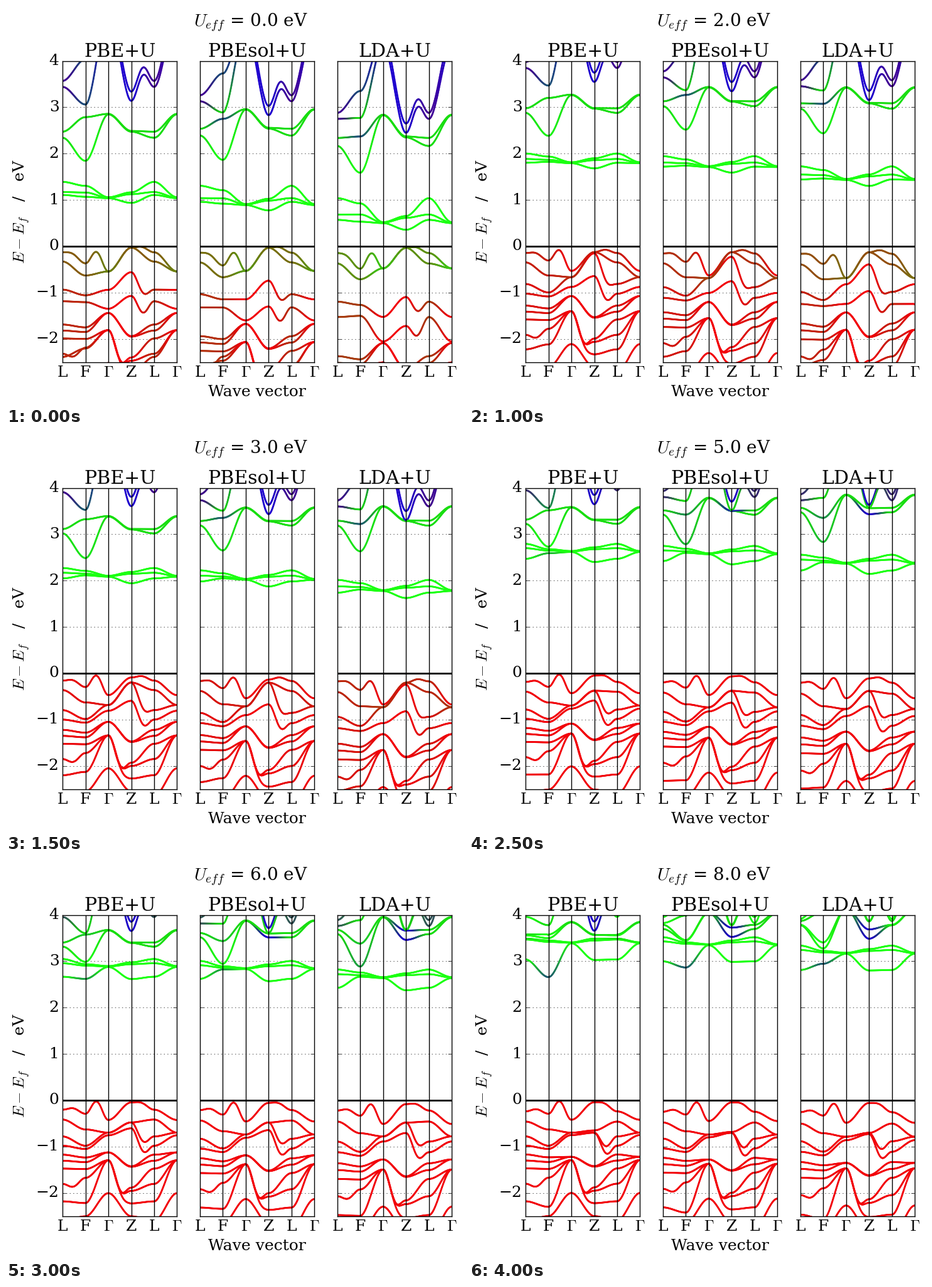
A matplotlib script for the animation above (4.5 s loop, 728 by 636 pixels).

```python
import numpy as np
import matplotlib.pyplot as plt
from matplotlib.animation import FuncAnimation
from matplotlib.collections import LineCollection

W, H, DPI = 728, 636, 100
LEFT, BOTTOM, AX_W, AX_H, STEP = 90.12, 68.4, 182.35, 480, 218.82
U_MAX = 8
plt.rcParams.update({"font.family": "DejaVu Serif", "font.size": 18,
                     "mathtext.fontset": "cm", "axes.linewidth": 1.0})

RED = np.array([0.96, 0.02, 0.08])
GREEN = np.array([0.18, 1.0, 0.13])
BLUE = np.array([0.19, 0.0, 0.85])
PURPLE = np.array([0.36, 0.0, 0.66])

# Levels of each orbital group at the symmetry points, in eV from the centre
# of the group: energy, then optionally its pull by the offset and its drift with U
L = dict(s=[(0.30,), (0.43,)],
         eg=[(-0.35, -0.30), (-0.26, -0.22)],
         t2g=[(0.06, 0, -0.42), (0.07, 0.10), (0.16, 0.35)],
         d=[(-0.13, 0, -0.11), (-0.33, 0, -0.13)],
         p=[(-0.78, 0.7), (-0.98, 0.6), (-1.17,), (-1.30,), (-1.47,), (-1.80,),
            (-2.18, 0.6), (-2.60,)])
F = dict(s=[(-0.08,), (0.90,)],
         eg=[(-0.06,)],
         dip=[(-0.77, -0.45, -0.41)],
         t2g=[(0.02,), (0.05, 0.12), (0.10, 0.30)],
         d=[(-0.29, -0.15), (-0.63,)],
         p=[(-0.98, 0.85), (-1.05, 0.7), (-1.23,), (-1.33,), (-1.48,), (-1.67,),
            (-2.05, 0.7, -0.25), (-2.50,)])
G = dict(s=[(1.90,), (2.10,)],
         eg=[(0.0,), (0.01,)],
         t2g=[(-0.01,), (0.0,), (0.01,)],
         d=2 * [(-0.70, 0.3)],
         p=[(-0.42,), (-0.75, -0.15)] + 2 * [(-0.92, 0, -0.30)]
           + 3 * [(-1.29,)] + [(-2.0,)])
Z = dict(s=[(0.0,), (0.20,)],
         eg=[(-0.27, -0.20), (-0.26, -0.19)],
         t2g=[(-0.07, -0.08, -0.30), (0.05, 0.05), (0.09, 0.05)],
         d=2 * [(-0.03, 0, -0.67)],
         p=[(-0.04,), (-0.50, -0.1, -0.15), (-1.42,), (-1.43,), (-1.88,),
            (-1.95,), (-2.22,), (-2.50,)])
PATH = [L, F, G, Z, L, G]

# Arches between two symmetry points: (band from below, segment, height)
ARCHES = [(9, 0, 0.07), (9, 1, 0.33), (9, 3, 0.06), (7, 3, -0.25), (6, 3, -0.30),
          (3, 2, -0.35), (2, 2, -0.30), (1, 2, -0.20), (2, 0, -0.12),
          (15, 3, 0.40), (16, 3, 0.40)]

# s, eg and t2g: group centres; offset and decay: shift of the p and s states
# against the d states, fading as U grows; stretch: width of the valence bands
PANELS = [dict(name="PBE+U", s=3.66, eg=3.16, t2g=1.36,
               offset=0.52, decay=1.3, stretch=1.0),
          dict(name="PBEsol+U", s=3.53, eg=3.37, t2g=1.32,
               offset=0.70, decay=1.5, stretch=1.06),
          dict(name="LDA+U", s=3.50, eg=3.46, t2g=1.14,
               offset=1.05, decay=1.8, stretch=1.13)]

X = np.linspace(0, 5, 201)


def mix(a, b, share):
    share = min(max(share, 0), 1)
    return a * (1 - share) + b * share


def tint(group, point, u, panel):
    """Orbital character as red (p), green (d) and blue (s) weights."""
    green = np.sqrt(panel["offset"]) * np.exp(-(u / (1.6 * panel["decay"]))**2)
    grown = u / U_MAX
    if group == "s":
        base = PURPLE if point is L else BLUE
        return mix(base, GREEN, 0.4 * (point is F) + grown**3 * (point is not Z))
    if group == "dip":
        return mix(GREEN, BLUE, 0.55 * grown**2)
    if group == "d":
        return mix(RED, GREEN, green * (0.8 if point is G else 0.62))
    if group == "p":
        return mix(RED, GREEN, green * (0.3 if point in (L, F) else 0))
    return GREEN * (0.9 if group == "eg" else 1)


def levels(point, u, panel):
    """Sorted energies at one symmetry point, with their colours."""
    shift = panel["offset"] * np.exp(-u / panel["decay"])
    drift = (u / U_MAX)**1.4
    eg = panel["eg"] + 0.085 * u - 0.6 * shift
    centre = dict(s=panel["s"] - shift, eg=eg, dip=eg,
                  t2g=panel["t2g"] + 0.255 * u - 0.6 * shift, d=0, p=-shift)
    found = []
    for group, members in point.items():
        scale = panel["stretch"] if group in "dp" else 1
        color = tint(group, point, u, panel)
        for e, pull, sink in ((*m, 0, 0)[:3] for m in members):
            found.append((centre[group] + scale * e + pull * shift + sink * drift, color))
    found.sort(key=lambda level: level[0])
    energy, colors = zip(*found)
    return np.array(energy), np.array(colors)


def along(nodes, x):
    """Ease from node to node, flat at every symmetry point."""
    i = np.minimum(x.astype(int), len(nodes) - 2)
    t = x - i
    t = (t * t * (3 - 2 * t)).reshape((-1,) + (1,) * (nodes.ndim - 1))
    return nodes[i] * (1 - t) + nodes[i + 1] * t


def bands(u, panel):
    energy, colors = zip(*(levels(point, u, panel) for point in PATH))
    curves = along(np.array(energy), X)
    for band, seg, height in ARCHES:
        inside = (X >= seg) & (X <= seg + 1)
        curves[inside, band] += height * np.sin(np.pi * (X[inside] - seg))**2
    shades = along(np.array(colors), (X[1:] + X[:-1]) / 2)**1.3
    pts = np.stack([np.broadcast_to(X[:, None], curves.shape), curves], axis=-1)
    segments = np.stack([pts[:-1], pts[1:]], axis=2)
    return segments.reshape(-1, 2, 2), shades.reshape(-1, 3)


def make_axes(n, panel):
    ax = fig.add_axes([(LEFT + STEP * n) / W, BOTTOM / H, AX_W / W, AX_H / H])
    ax.set_xlim(0, 5)
    ax.set_ylim(-2.5, 4)
    ax.set_title(panel["name"], fontsize=21.6, pad=5)
    ax.set_xticks(range(6), ["L", "F", r"$\Gamma$", "Z", "L", r"$\Gamma$"])
    ticks = range(-2, 5)
    ax.set_yticks(ticks, [str(v).replace("-", "\u2212") if n == 0 else ""
                          for v in ticks], va="center")
    ax.tick_params(direction="in", length=4, width=0.5, pad=4, top=True, right=True)
    ax.grid(axis="y", color="black", linewidth=0.5, linestyle=(0, (2, 6)))
    ax.set_axisbelow(True)
    for x in range(1, 5):
        ax.axvline(x, color="black", linewidth=1)
    ax.axhline(0, color="black", linewidth=2)
    lines = LineCollection([], linewidths=2, capstyle="round", zorder=1)
    ax.add_collection(lines, autolim=False)
    return lines


fig = plt.figure(figsize=(W / DPI, H / DPI), dpi=DPI, facecolor="white")
bundles = [make_axes(n, panel) for n, panel in enumerate(PANELS)]
fig.text((LEFT + STEP + AX_W / 2) / W, 14 / H, "Wave vector",
         ha="center", va="baseline")
fig.text(30 / W, (BOTTOM + AX_H / 2) / H, "$E - E_f$   /   eV", rotation=90,
         rotation_mode="anchor", ha="center", va="baseline")
heading = fig.text(390.12 / W, 603 / H, "", fontsize=20, ha="center", va="baseline")


def update(frame):
    u = float(frame)
    heading.set_text(r"$U_{eff}$ = %.1f eV" % u)
    for lines, panel in zip(bundles, PANELS):
        segments, shades = bands(u, panel)
        lines.set_segments(segments)
        lines.set_color(shades)
    return [heading, *bundles]


anim = FuncAnimation(fig, update, frames=U_MAX + 1, interval=500, repeat=True,
                     repeat_delay=0, blit=False)
plt.show()
```
